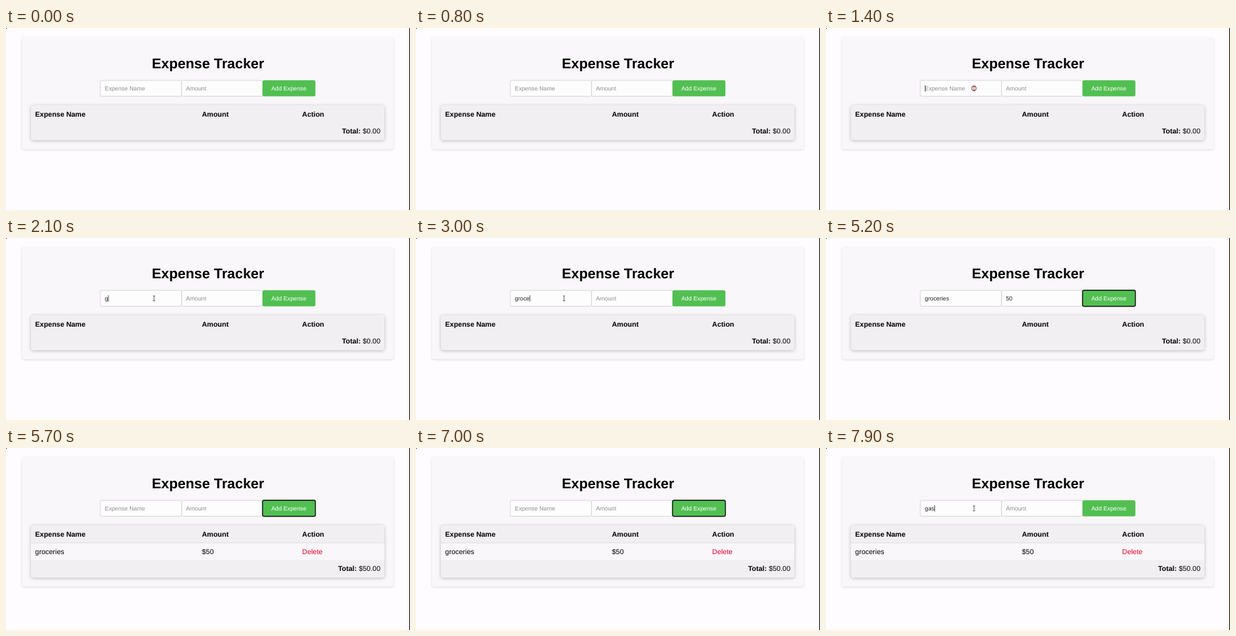
These frames come from a looping animation (600 by 271 pixels, 8000 ms). An HTML page:

```html
<!DOCTYPE html>
<html lang="en">
<head>
<meta charset="utf-8">
<title>Expense Tracker</title>
<style>
  html, body { margin: 0; width: 100%; height: 100%; overflow: hidden; background: #fefcfe; }
  svg { display: block; font: 10.5px "Liberation Sans", Arial, sans-serif; text-rendering: geometricPrecision; }
  .bold { font-weight: 700; }
  .small { font-size: 8.75px; }
  .field { fill: #fefdfe; stroke: #d6d4d6; }
  #card { fill: #f9f7f9; filter: drop-shadow(0 1px 1.5px rgba(0, 0, 0, .13)); }
  #table { fill: #f1eff1; filter: drop-shadow(0 1.5px 2.5px rgba(0, 0, 0, .24)); }
</style>
</head>
<body>
<svg width="600" height="271" viewBox="0 0 600 271">
  <rect id="card" x="23.5" y="13.5" width="552.5" height="167" rx="4"/>
  <text class="bold" x="300" y="60" font-size="21" text-anchor="middle">Expense Tracker</text>

  <rect class="field" x="140" y="78" width="120.5" height="23.7" rx="2"/>
  <rect class="field" x="260.8" y="78" width="120.2" height="23.7" rx="2"/>
  <text class="small" id="name" x="146.8" y="93"/>
  <text class="small" id="amount" x="267.2" y="93"/>
  <rect id="button" x="381" y="77.8" width="78.5" height="24" rx="2.6" fill="#52bf52"/>
  <text class="small" x="420" y="93" fill="#fff" text-anchor="middle">Add Expense</text>

  <rect id="table" x="37" y="115" width="525" height="52" rx="4"/>
  <g class="bold">
    <text x="43.3" y="132">Expense Name</text>
    <text x="291" y="132">Amount</text>
    <text x="439.8" y="132">Action</text>
  </g>
  <g id="row">
    <path d="M37 141h525v26h-525z" fill="#f9f7f9"/>
    <path d="M37 141.3h525" stroke="#dddbdd" stroke-width=".8"/>
    <text x="43.3" y="157.7">groceries</text>
    <text x="291" y="157.7">$50</text>
    <text x="439.8" y="157.7" fill="#e3002b">Delete</text>
  </g>
  <text id="total" x="556" text-anchor="end"><tspan class="bold">Total:</tspan> <tspan id="sum"/></text>

  <rect id="caret" y="85.3" width=".8" height="9.4" fill="#222"/>
  <g id="pointer" fill="none" stroke="#555" stroke-width=".9">
    <circle id="ring" cx="219.8" cy="89.8" r="3.2" stroke="#b3333c" stroke-width="1.1"/>
    <path d="M218.2 86.2h3.4M219.9 86.2v7.4M218.2 93.6h3.4"/>
  </g>
  <path d="M599 0h1v271h-1zM0 0h1v1h-1z" fill="#000"/>
</svg>
<script>
const $ = id => document.getElementById(id);
const LOOP = 8000, ADD = 5300;
const firstKeys = [2100, 2300, 2500, 2700, 2900, 3200, 3400, 3600, 3800];
const amountKeys = [4600, 4800];
const secondKeys = [7500, 7700, 7800];
// [start, end, focused part]
const focusSpans = [[1300, 4300, "name"], [4300, 5100, "amount"], [5100, 7200, "button"], [7200, LOOP, "name"]];

const within = (t, a, b) => t >= a && t < b;
const typed = (word, keys, t) => word.slice(0, keys.filter(k => k <= t).length);
const show = (id, on) => $(id).setAttribute("visibility", on ? "visible" : "hidden");

function fillField(id, value, hint) {
  $(id).textContent = value || hint;
  $(id).setAttribute("fill", value ? "#222" : "#8e8c8e");
}

function draw(t) {
  const added = t >= ADD;
  const shift = added ? 26 : 0;
  const values = {
    name: added ? typed("gas", secondKeys, t) : typed("groceries", firstKeys, t),
    amount: added ? "" : typed("50", amountKeys, t)
  };
  fillField("name", values.name, "Expense Name");
  fillField("amount", values.amount, "Amount");

  $("card").setAttribute("height", 167 + shift);
  $("table").setAttribute("height", 52 + shift);
  $("total").setAttribute("y", 157.3 + shift);
  $("sum").textContent = added ? "$50.00" : "$0.00";
  show("row", added);

  const span = focusSpans.find(([a, b]) => within(t, a, b));
  const focus = span && span[2];
  $("button").setAttribute("stroke", focus === "button" ? "#111" : "none");
  $("button").setAttribute("stroke-width", 1.4);

  // The caret restarts its blink at every key press
  const inField = focus in values;
  if (inField) {
    const since = Math.max(span[0], ...[...firstKeys, ...amountKeys, ...secondKeys].filter(k => k <= t));
    const width = values[focus] ? $(focus).getComputedTextLength() : 0;
    $("caret").setAttribute("x", +$(focus).getAttribute("x") + width);
    show("caret", (t - since) % 1060 < 530);
  } else show("caret", false);

  show("pointer", within(t, 1100, 3900) || t >= 7100);
  $("ring").setAttribute("opacity", within(t, 1300, 1600) || within(t, 7200, 7400) ? 1 : 0);
}

function frame(now) {
  draw(now % LOOP);
  requestAnimationFrame(frame);
}
draw(0);
requestAnimationFrame(frame);
</script>
</body>
</html>
```
